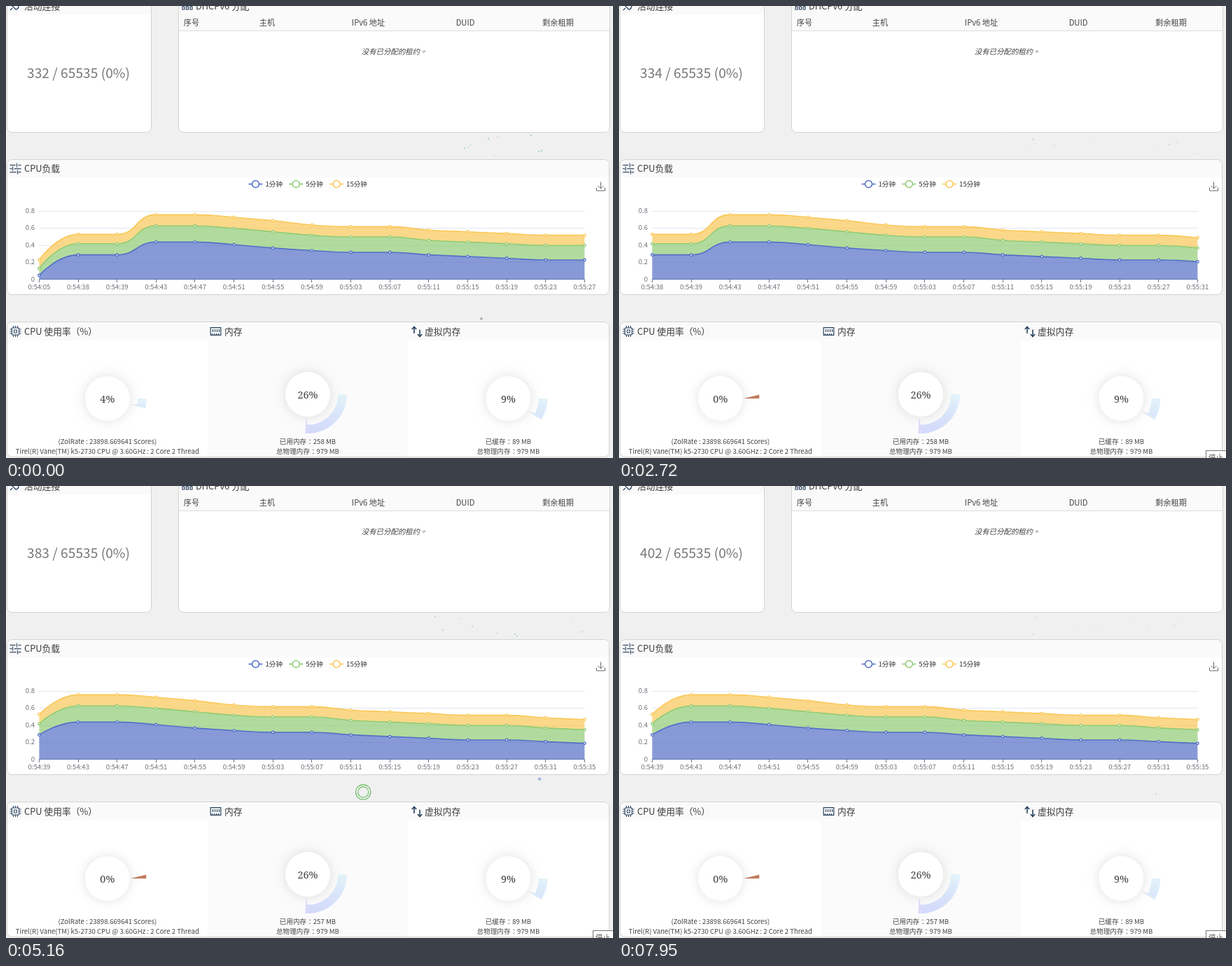
Animation, 867 px wide and 646 px high, one loop 8000 ms. Source, as an HTML page with a canvas:

```html
<!DOCTYPE html>
<html lang="zh-Hant">
<head>
<meta charset="utf-8">
<style>
html, body { margin: 0; width: 100%; height: 100%; overflow: hidden; background: #f0f0f0; }
canvas { display: block; }
</style>
</head>
<body>
<canvas id="stage" lang="zh-Hant" width="867" height="646"></canvas>
<script>
const ctx = document.getElementById('stage').getContext('2d');
ctx.lang = 'zh-Hant';
const LOOP = 8000, SLIDE = 450, SHIFTS = [528, 4660];
const SANS = '"Noto Sans CJK TC", "Noto Sans CJK SC", "Noto Sans CJK", sans-serif';
const SERIF = '"Noto Serif", serif';
const INK = '#2b4360', AXIS = '#6e7079';

const SERIES = [
  { name: '1分钟', color: '#5470c6', values: [5, 29, 29, 44, 44, 41, 37, 34, 32, 32, 29, 27, 25, 23, 23, 21, 19] },
  { name: '5分钟', color: '#91cc75', values: [13, 42, 42, 63, 63, 60, 56, 52, 50, 50, 46, 44, 42, 40, 40, 37, 35] },
  { name: '15分钟', color: '#fac858', values: [23, 53, 53, 76, 76, 73, 69, 64, 62, 62, 58, 56, 54, 52, 52, 49, 47] }
];
const SECONDS = [5, 38, ...Array.from({ length: 15 }, (_, i) => 39 + 4 * i)];
const LEFT = 47.4, RIGHT = 826.4, BASE = 391, STEP = (RIGHT - LEFT) / 14;

const CONNECTIONS = [[0, 332], [1200, 334], [4730, 383], [5400, 385], [7100, 387], [7650, 402]];
const MEMORY = [[0, 258], [528, 257], [1300, 258], [4730, 257]];
const CPU = [[0, 4], [528, 0]];

const valueAt = (steps, t) => steps.filter(s => s[0] <= t).pop()[1];
const clamp = (v, a, b) => Math.max(Math.min(a, b), Math.min(Math.max(a, b), v));
const easeInOut = p => p < .5 ? 4 * p ** 3 : 1 - 4 * (1 - p) ** 3;
const valueY = v => BASE - v * 1.219;

function random(seed) {
  const s = Math.sin(seed * 127.1 + 11.7) * 43758.5453;
  return s - Math.floor(s);
}

// y is the vertical centre; the baseline snaps to a whole pixel
function text(str, x, y, size, color = '#444', align = 'center', style = '', family = SANS) {
  ctx.font = `${style} ${size}px ${family}`;
  ctx.fillStyle = color;
  ctx.textAlign = align;
  ctx.fillText(str, x, Math.round(y + size * .37));
}

function line(x1, y1, x2, y2, color, width = 1) {
  ctx.strokeStyle = color;
  ctx.lineWidth = width;
  ctx.beginPath();
  ctx.moveTo(x1, y1);
  ctx.lineTo(x2, y2);
  ctx.stroke();
}

function circle(x, y, r, stroke, width, fill) {
  ctx.beginPath();
  ctx.arc(x, y, r, 0, 7);
  if (fill) { ctx.fillStyle = fill; ctx.fill(); }
  if (stroke) { ctx.strokeStyle = stroke; ctx.lineWidth = width; ctx.stroke(); }
}

function icon(x, y, path, width = 1.2, color = INK) {
  ctx.save();
  ctx.translate(x, y);
  ctx.strokeStyle = color;
  ctx.lineWidth = width;
  ctx.stroke(new Path2D(path));
  ctx.restore();
}

// White card with a tinted header strip down to headerBottom
function panel(x, y, w, h, headerBottom) {
  ctx.save();
  ctx.beginPath();
  ctx.roundRect(x + .5, y + .5, w, h, 7);
  ctx.fillStyle = '#fff';
  ctx.fill();
  ctx.save();
  ctx.clip();
  ctx.fillStyle = '#fafafa';
  ctx.fillRect(x, y, w + 1, headerBottom - y);
  ctx.restore();
  ctx.strokeStyle = '#d3d3d3';
  ctx.lineWidth = 1;
  ctx.stroke();
  ctx.restore();
}

function drawParticles(t) {
  const life = 800, burst = Math.floor(t / life), age = t % life / life;
  for (let i = 0; i < 9; i++) {
    const r = k => random(burst * 61 + i * 5 + k);
    ctx.globalAlpha = .75 - .5 * age;
    circle(575 + 255 * r(1) + (r(2) - .5) * 40 * age, 182 + 32 * r(3) + 6 * age,
      .5 + .5 * r(4), null, 0, `hsl(${random(burst) * 90 + 40 + r(2) * 90} 45% 55%)`);
  }
  ctx.globalAlpha = 1;

  const green = '#6cbd62';
  if (t > 500 && t < 2100) {
    const d = t - 780;
    circle(714 - d * .19, 452.5 - d * .011, 5 + d * .004, green, 1);
    circle(714 - d * .19, 452.5 - d * .011, 3 + d * .003, green, .8);
  }
  if (t > 4200 && t < 6100) {
    const d = t - 4670, x = 603.5 - d * .19, y = 436.5 + d * .002;
    ctx.globalAlpha = clamp((6100 - t) / 500, 0, 1);
    circle(x, y, 8.2 + d * .005, green, 1.1);
    circle(x, y, 5.6 + d * .004, green, 1.1);
    ctx.globalAlpha = 1;
  }
  if (t > 4300 && t < 5500) circle(748.5 + (t - 4670) * .028, 434 - (t - 4670) * .031, 1.5, '#5f7fd0', 1);
  if (t > 6250 && t < 6900) circle(458 - (t - 6490) * .3, 195.5, 3.8, '#c4963c', 1.4);
  if (t < 250) circle(679, 447 - t * .02, 1.3, '#777', .8);
  if (t > 7700) circle(767, 440, .8, null, 0, '#aaa');
}

// Smooth path whose control points stay within neighbouring values
function smoothTo(points) {
  const controls = points.map((p, i) => {
    const a = points[i - 1], b = points[i + 1];
    if (!a || !b) return [p, p];
    const before = Math.hypot(p[0] - a[0], p[1] - a[1]) || 1e-3;
    const after = Math.hypot(b[0] - p[0], b[1] - p[1]) || 1e-3;
    const v = [0, 1].map(k => {
      const next = clamp(p[k] + (b[k] - a[k]) * .5 * after / (before + after), p[k], b[k]);
      return clamp(p[k] - (next - p[k]) * before / after, a[k], p[k]);
    });
    return [v, v.map((c, k) => p[k] + (p[k] - c) * after / before)];
  });
  for (let i = 1; i < points.length; i++)
    ctx.bezierCurveTo(...controls[i - 1][1], ...controls[i][0], ...points[i]);
}

function drawChart(t) {
  panel(1, 219, 860, 193, 245);
  icon(5.5, 224.5, 'M0 3h8M12 3h4M10 0v6M0 8h3M6 8h10M4 5v6M0 13h9M12 13h4M11 10v6', 1.3, '#4c5d74');
  text('CPU负载', 26, 232, 12.8, '#3c3c3c', 'left');
  icon(843, 251.5, 'M6.5 0v9M2.5 5.5l4 4l4-4M.5 8v4.5h12v-4.5', 1, '#666');

  SERIES.forEach((s, i) => {
    const x = 356.5 + i * 57.8;
    line(x - 10, 254.5, x + 10, 254.5, s.color, 1.6);
    circle(x, 254.5, 5, s.color, 1.6, '#fff');
    text(s.name, x + 14, 254, 9.6, '#333', 'left');
  });

  for (let v = 0; v <= 80; v += 20) {
    const y = Math.floor(valueY(v)) + .5;
    if (v) line(LEFT, y, RIGHT, y, '#e0e6f1');
    text(v / 100, 41, y - 1, 9.6, AXIS, 'right');
  }
  line(LEFT, BASE - .5, RIGHT, BASE - .5, AXIS);

  const first = SHIFTS.filter(s => s <= t).length;
  const since = first ? t - SHIFTS[first - 1] : Infinity;
  const lag = (1 - easeInOut(Math.min(1, since / SLIDE))) * STEP;
  for (let i = 0; i < 15; i++) {
    const x = LEFT + i * STEP, s = SECONDS[first + i], tick = Math.floor(x) + .5;
    line(tick, BASE, tick, BASE + 4, AXIS);
    text(`0:${54 + Math.floor(s / 60)}:${String(s % 60).padStart(2, '0')}`, x, 401, 9.6, AXIS);
  }

  const curves = SERIES.map(s => s.values.slice(first, first + 15).map((v, i) =>
    [i < 14 ? LEFT + i * STEP + lag : RIGHT, valueY(v)]));
  curves.forEach((points, n) => {
    const floor = n ? curves[n - 1] : [[points[0][0], BASE], [RIGHT, BASE]];
    const back = [...floor].reverse();
    ctx.beginPath();
    ctx.moveTo(...points[0]);
    smoothTo(points);
    ctx.lineTo(...back[0]);
    smoothTo(back);
    ctx.globalAlpha = .7;
    ctx.fillStyle = SERIES[n].color;
    ctx.fill();
    ctx.globalAlpha = 1;
  });
  curves.forEach((points, n) => {
    const { color, values } = SERIES[n];
    ctx.beginPath();
    ctx.moveTo(...points[0]);
    smoothTo(points);
    ctx.strokeStyle = color;
    ctx.lineWidth = 1.6;
    ctx.stroke();
    points.forEach(p => circle(...p, 1.7, color, 1.4, '#fff'));
    if (since < 200) {
      ctx.globalAlpha = 1 - since / 200;
      circle(LEFT, valueY(values[first - 1]), 1.7, color, 1.4, '#fff');
      ctx.globalAlpha = 1;
    }
  });
}

function drawGauge(x, y, percent, captions) {
  const end = percent / 100 * Math.PI * 2;
  ctx.save();
  ctx.translate(x, y);
  const tint = ctx.createLinearGradient(0, 0, 0, 56);
  tint.addColorStop(0, '#e3f3fa');
  tint.addColorStop(1, '#d2d8fb');
  ctx.fillStyle = tint;
  ctx.beginPath();
  ctx.arc(0, 0, 56, 0, end);
  ctx.arc(0, 0, 43.5, end, 0, true);
  ctx.fill();

  ctx.rotate(end);
  ctx.fillStyle = !percent ? '#c27b5d' : percent > 20 ? '#dcdcfb' : '#dceaf9';
  ctx.beginPath();
  ctx.moveTo(33, 0);
  ctx.lineTo(55.5, -5.5);
  ctx.lineTo(55.5, 0);
  ctx.fill();
  ctx.rotate(-end);

  ctx.shadowColor = 'rgba(0,0,0,.12)';
  ctx.shadowBlur = 16;
  circle(0, 0, 32, null, 0, '#fff');
  ctx.restore();
  text(percent + '%', x, y + 1, 14.4, '#3f3f3f', 'center', '500', SERIF);
  captions.forEach((c, i) => text(c, x, 622.4 + i * 14.5, 9.6, '#444'));
}

function drawGauges(t) {
  panel(1, 451, 860, 193, 478);
  ctx.fillStyle = '#fbfbfb';
  ctx.fillRect(288, 452, 286, 192);
  icon(5.5, 457, 'M3 3h10v10h-10zM6 6h4v4h-4zM5 0v3M8 0v3M11 0v3M5 13v3M8 13v3M11 13v3M0 5h3M0 8h3M0 11h3M13 5h3M13 8h3M13 11h3', 1);
  icon(291.5, 459, 'M.7.7h14.6v10.6h-14.6zM4 3v4M7 3v4M10 3v4M13 3v4M3 9v2M6 9v2M9 9v2M12 9v2');
  icon(579, 457, 'M4 11V1.5M.8 5L4 1.5L7.2 5M12 5.5V15.5M8.8 12L12 15.5L15.2 12', 1.6);
  text('CPU 使用率（%）', 26, 465, 12.8, '#3c3c3c', 'left');
  text('内存', 312, 465, 12.8, '#3c3c3c', 'left');
  text('虚拟内存', 598, 465, 12.8, '#3c3c3c', 'left');

  drawGauge(144.8, 561, valueAt(CPU, t),
    ['(ZolRate : 23898.669641 Scores)', 'Tirel(R) Vane(TM) k5-2730 CPU @ 3.60GHz : 2 Core 2 Thread']);
  drawGauge(430.9, 555, 26, [`已用内存：${valueAt(MEMORY, t)} MB`, '总物理内存：979 MB']);
  drawGauge(717.4, 561, 9, ['已缓存：89 MB', '总物理内存：979 MB']);
}

function drawTop(t) {
  panel(1, -30, 206, 210, 12);
  icon(5, -6, 'M1 12l3-3M4 6l5 5q4-1 4-5l-3-4q-5 0-6 4M9 1l3-3M12 4l3-3', 1.4);
  text('活动连接', 26, 0, 12.8, '#3c3c3c', 'left');
  text(`${valueAt(CONNECTIONS, t)} / 65535 (0%)`, 103.5, 96, 19.2, '#777');

  panel(246, -30, 616, 210, 36);
  line(247, 35.5, 862, 35.5, '#dcdcdc');
  icon(251, -9, 'M6 1h4v4h-4zM1 10h3v4h-3zM6.5 10h3v4h-3zM12 10h3v4h-3zM8 5v5M2.5 10v-2.5h11v2.5', 1.2);
  text('DHCPv6 分配', 271, 0, 12.8, '#3c3c3c', 'left');
  [['序号', 265], ['主机', 373], ['IPv6 地址', 517.5], ['DUID', 656], ['剩余租期', 788.5]]
    .forEach(([label, x]) => text(label, x, 24, 11.2));
  text('没有已分配的租约。', 554.5, 65, 10.4, '#444', 'center', 'italic');
}

function drawTooltip() {
  ctx.fillStyle = '#fff';
  ctx.fillRect(838, 636, 40, 20);
  ctx.strokeStyle = '#777';
  ctx.lineWidth = 1;
  ctx.strokeRect(838.5, 635.5, 40, 20);
  text('停止', 842, 645.5, 10.4, '#555', 'left');
}

function frame(now) {
  const t = now % LOOP;
  ctx.fillStyle = '#f0f0f0';
  ctx.fillRect(0, 0, 867, 646);
  drawParticles(t);
  drawTop(t);
  drawChart(t);
  drawGauges(t);
  if (t >= 420) drawTooltip();
  requestAnimationFrame(frame);
}
requestAnimationFrame(frame);
</script>
</body>
</html>
```
